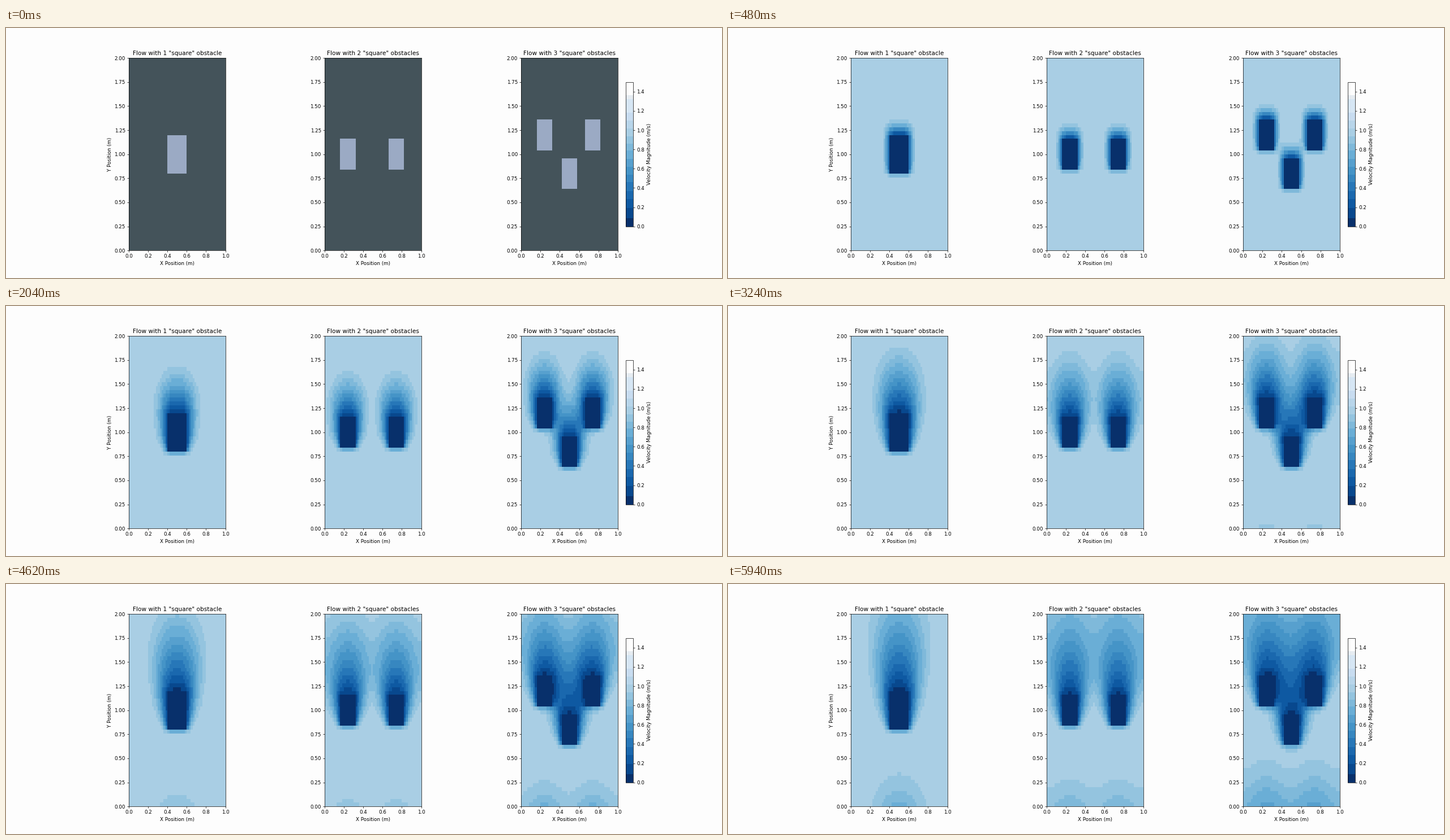
These frames come from a looping animation (1265 by 443 pixels, 6 s). A matplotlib script:

```python
import numpy as np
import matplotlib.pyplot as plt
from matplotlib.animation import FuncAnimation
from matplotlib.cm import ScalarMappable
from matplotlib.colors import ListedColormap, Normalize

W, H, DPI = 1265, 443, 63.25
FRAMES, INTERVAL = 100, 60
N = 50                      # cells per side; the domain is 1 m by 2 m
DT, NU = 0.01, 0.01
DX, DY = 1 / N, 2 / N
V_MAX = 1.5
PAPER = "#fdfdfd"

# Obstacles as (column, row, size) in cells
SCENES = [
    [(20, 20, 10)],
    [(8, 21, 8), (33, 21, 8)],
    [(8, 26, 8), (33, 26, 8), (21, 16, 8)],
]
TITLES = [
    'Flow with 1 "square" obstacle',
    'Flow with 2 "square" obstacles',
    'Flow with 3 "square" obstacles',
]

# Colour bands of the velocity scale
EDGES = np.array([0, .085, .19, .285, .37, .46, .54, .62, .70, .79, .86, .937,
                  1.02, 1.10, 1.18, 1.32, 1.366, V_MAX])


def banded_cmap():
    mids = (EDGES[:-1] + EDGES[1:]) / 2
    bands = [tuple(c) for c in plt.get_cmap("Blues_r")(mids / V_MAX)]
    bands[0] = "#08306b"
    bands[11] = "#a9cee4"
    bands[15] = "#e6ecf1"
    bands[16] = PAPER
    levels = (np.arange(512) + 0.5) / 512 * V_MAX
    return ListedColormap([bands[i] for i in np.digitize(levels, EDGES[1:-1])])


def block_mask(blocks):
    mask = np.zeros((N, N), bool)
    for col, row, size in blocks:
        mask[row:row + size, col:col + size] = True
    return mask


def step(v, mask):
    """Upwind advection and diffusion on a periodic grid."""
    below, above = np.roll(v, 1, 0), np.roll(v, -1, 0)
    left, right = np.roll(v, 1, 1), np.roll(v, -1, 1)
    new = (v - DT / DY * v * (v - below)
           + NU * DT / DX**2 * (left - 2 * v + right)
           + NU * DT / DY**2 * (below - 2 * v + above))
    new[mask] = 0
    return new


def simulate(blocks):
    mask = block_mask(blocks)
    fields = [np.where(mask, 0.0, 1.0)]
    while len(fields) < FRAMES:
        fields.append(step(fields[-1], mask))
    return fields


plt.rcParams["font.family"] = "DejaVu Sans"
flow_cmap = banded_cmap()
start_cmap = ListedColormap(["#9baac4", "#44535a"])
norm = Normalize(0, V_MAX)
x_edges, y_edges = np.linspace(0, 1, N + 1), np.linspace(0, 2, N + 1)

fig, axes = plt.subplots(1, 3, figsize=(W / DPI, H / DPI), dpi=DPI,
                         facecolor=PAPER)
runs = [simulate(blocks) for blocks in SCENES]
meshes = []
for ax, title, run in zip(axes, TITLES, runs):
    meshes.append(ax.pcolormesh(x_edges, y_edges, run[0], cmap=start_cmap,
                                norm=norm))
    ax.set_aspect("equal")
    ax.set_title(title)
    ax.set_xlabel("X Position (m)")
    ax.set_xticks(np.linspace(0, 1, 6))
    ax.set_yticks(np.linspace(0, 2, 9))
axes[0].set_ylabel("Y Position (m)")
bar = fig.colorbar(ScalarMappable(norm, flow_cmap), ax=axes[2], shrink=0.75,
                   ticks=np.arange(8) * 0.2, format="%.1f")
bar.set_label("Velocity Magnitude (m/s)")


def update(i):
    for mesh, run in zip(meshes, runs):
        mesh.set_array(run[i])
        mesh.set_cmap(flow_cmap if i else start_cmap)
    return meshes


def reset():
    return update(0)


anim = FuncAnimation(fig, update, frames=FRAMES, init_func=reset,
                     interval=INTERVAL, repeat=True, repeat_delay=0)
plt.show()
```
